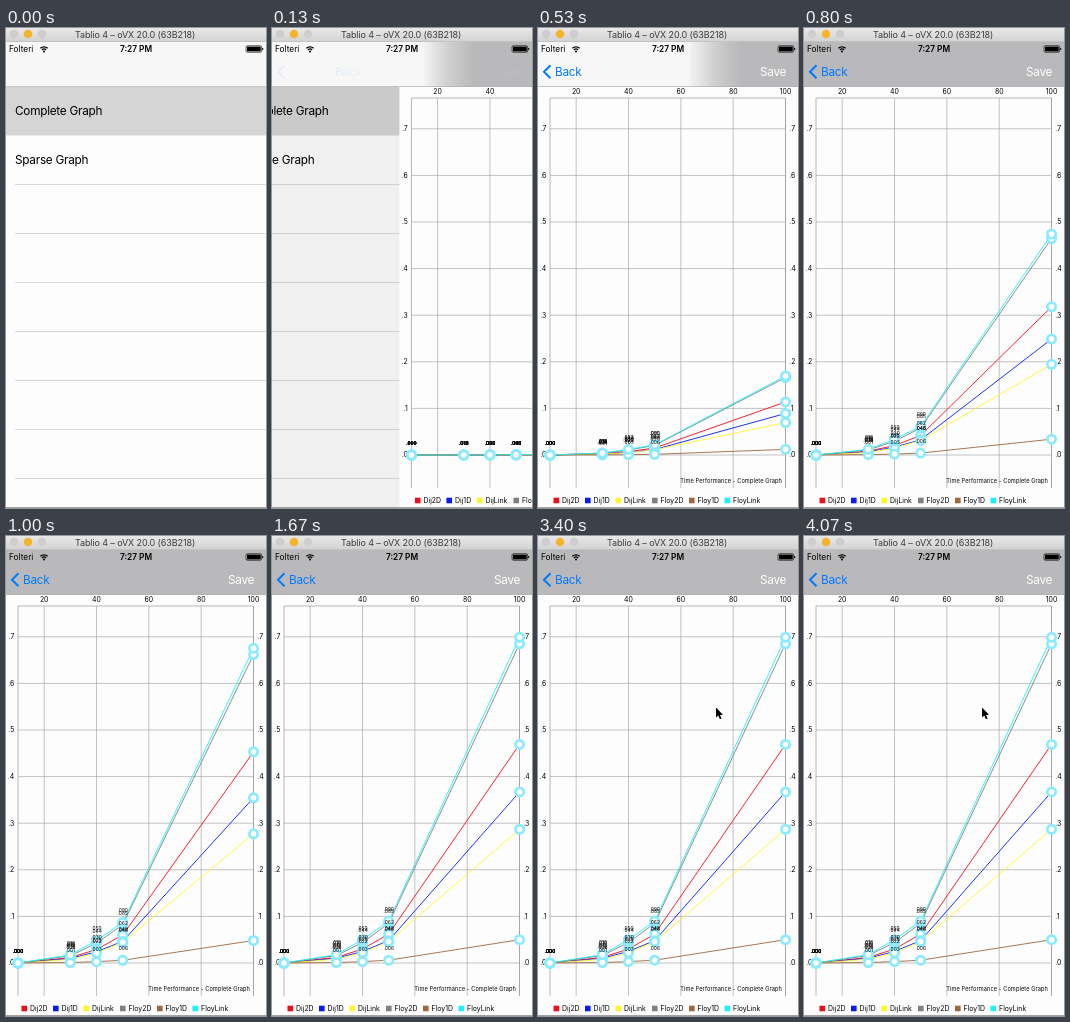
Recreate the animation shown at these times as an HTML page with a canvas. Size 260 px wide and 480 px high, loop 4140 ms.

```html
<!DOCTYPE html>
<html lang="en">
<head>
<meta charset="utf-8">
<title>Time performance chart</title>
<style>
html, body { margin: 0; width: 100%; height: 100%; overflow: hidden; background: #fff; }
canvas { display: block; width: 260px; height: 480px; }
</style>
</head>
<body>
<canvas id="stage"></canvas>
<script>
const W = 260, H = 480, LOOP = 4140, STEP = 1000 / 15;
const canvas = document.getElementById('stage');
const ratio = window.devicePixelRatio || 1;
canvas.width = W * ratio;
canvas.height = H * ratio;
const c = canvas.getContext('2d');
c.scale(ratio, ratio);

const BLUE = '#007aff';
const NAV_BOTTOM = 59;
const sizes = [10, 30, 40, 50, 100];
const series = [
  { name: 'Dij2D', color: '#f00d1c', at: 15.5, values: [0, .012, .030, .062, .469] },
  { name: 'Dij1D', color: '#0a1cf5', at: 47, values: [0, .010, .025, .048, .367] },
  { name: 'DijLink', color: '#fff52b', at: 77.5, values: [0, .008, .022, .046, .287] },
  { name: 'Floy2D', color: '#808080', at: 114, values: [0, .016, .044, .085, .685] },
  { name: 'Floy1D', color: '#a0683f', at: 151, values: [0, .001, .003, .006, .050] },
  { name: 'FloyLink', color: '#1cf3fb', at: 186.5, values: [0, .018, .050, .090, .699] }
];

const clamp = (v, lo = 0, hi = 1) => Math.min(hi, Math.max(lo, v));
const mix = (a, b, p) => a + (b - a) * p;
const px = size => 12 + (size - 10) * 2.617;
const py = value => 427 - value * 466;
const decimals = (v, n) => v.toFixed(n).replace(/^0/, '');

function rect(x, y, w, h, color) {
  c.fillStyle = color;
  c.fillRect(x, y, w, h);
}

function disc(x, y, r, color) {
  c.fillStyle = color;
  c.beginPath();
  c.arc(x, y, r, 0, 7);
  c.fill();
}

function stroke(points, color, width) {
  c.strokeStyle = color;
  c.lineWidth = width;
  c.beginPath();
  points.forEach(([x, y]) => c.lineTo(x, y));
  c.stroke();
}

function text(str, x, y, size, { color = '#000', align = 'left', weight = 400, spacing = 0 } = {}) {
  c.font = `${weight} ${size}px Inter, "Liberation Sans", sans-serif`;
  c.letterSpacing = spacing + 'px';
  c.textAlign = align;
  c.fillStyle = color;
  c.fillText(str, x, y);
}

function gradient(x0, y0, x1, y1, ...stops) {
  const g = c.createLinearGradient(x0, y0, x1, y1);
  stops.forEach((color, i) => g.addColorStop(i / (stops.length - 1), color));
  return g;
}

function drawTitleBar() {
  rect(0, 0, W, 14, gradient(0, 0, 0, 14, '#e8e8e8', '#d2d2d2'));
  rect(0, 13.3, W, .7, '#bcbcbc');
  disc(8, 6, 4.3, '#cfcdcf');
  disc(22, 6, 4.3, '#f6b42c');
  disc(36, 6, 4.3, '#cfcdcf');
  text('Tablio 4 – oVX 20.0 (63B218)', 129, 9.8, 9, { color: '#3c3c3c', align: 'center', spacing: -.1 });
}

function drawStatus() {
  text('Folteri', 3, 24, 8.3);
  [2.3, 4.6].forEach(r => {
    c.strokeStyle = '#000';
    c.lineWidth = 1.3;
    c.beginPath();
    c.arc(38, 24, r + .6, -2.35, -.79);
    c.stroke();
  });
  disc(38, 23.6, 1, '#000');
  text('7:27 PM', 130, 24, 8.3, { align: 'center', weight: 600 });
  c.strokeStyle = '#000';
  c.lineWidth = .6;
  c.beginPath();
  c.roundRect(240, 17.7, 15.6, 6.6, 1.4);
  c.stroke();
  rect(241, 18.6, 13.7, 4.8, '#000');
  rect(256.2, 20, 1, 2, '#000');
}

function drawNav(t, slide, pageX) {
  rect(0, 14, W, 45, '#f7f7f7');
  if (t >= 600) {
    rect(0, 14, W, 45, '#b9b8ba');
  } else if (t >= 70) {
    const edge = Math.max(152, pageX);
    rect(edge, 14, W - edge, 45, gradient(edge, 0, edge + 50, 0, '#f3f3f3', '#cfcfcf', '#b9b8ba'));
  }
  rect(0, 58.3, W, .7, '#b0b0b2');
  if (t < 70) return;
  c.globalAlpha = slide ** 4;
  stroke([[12.5, 37.3], [6, 43.8], [12.5, 50.3]], BLUE, 2);
  text('Back', 17 + pageX * .36, 48, 11.8, { color: BLUE, spacing: -.27 });
  text('Save', 222, 48, 11.8, { color: '#fff', spacing: -.27 });
  c.globalAlpha = 1;
}

function drawList(slide) {
  c.save();
  c.translate(-78 * slide, 0);
  rect(0, NAV_BOTTOM, W, H, '#fdfdfe');
  rect(0, NAV_BOTTOM, W, 48.5, '#d5d5d6');
  for (let y = 156; y < 460; y += 49) rect(9, y, W, .8, '#d2d1d5');
  text('Complete Graph', 9, 87, 11.8, { spacing: -.27 });
  text('Sparse Graph', 9, 136, 11.8, { spacing: -.27 });
  c.restore();
  rect(0, NAV_BOTTOM, W, H, `rgba(0, 0, 0, ${.1 * slide})`);
}

function drawGrid() {
  const grid = '#a9a9ab';
  for (let i = 0; i <= 7; i++) {
    const y = py(i / 10), label = '.' + i;
    stroke([[12, y], [247.5, y]], grid, .7);
    text(label, 8.3, y + 2.4, 6.9, { align: 'right' });
    text(label, 251.3, y + 2.4, 6.9);
  }
  for (let size = 20; size <= 100; size += 20) {
    stroke([[px(size), 70], [px(size), 460]], grid, .7);
    text(size, px(size), 66, 6.9, { align: 'center' });
  }
  stroke([[12, 460], [12, 70], [247.5, 70], [247.5, 460]], '#98989a', .7);
}

function drawChart(phase) {
  drawGrid();
  const place = (v, i) => [px(sizes[i]), py(v * phase)];
  series.forEach(s => stroke(s.values.map(place), s.color, .9));
  series.forEach(s => s.values.map(place).forEach(([x, y]) => {
    disc(x, y, 5.5, '#8ceaff');
    disc(x, y, 2.8, '#fff');
  }));
  series.forEach(s => s.values.slice(0, 4).forEach((v, i) => {
    const [x, y] = place(v, i);
    text(decimals(v, 3), x, y - 10.2, 4.9, { align: 'center' });
  }));
  text('Time Performance - Complete Graph', 244, 455.4, 5.6, { align: 'right', spacing: .12 });
  series.forEach(s => {
    rect(s.at, 469.7, 5.6, 5.6, s.color);
    text(s.name, s.at + 8.6, 475, 6.9);
  });
}

function drawPage(t, pageX) {
  c.save();
  c.translate(pageX, 0);
  rect(0, NAV_BOTTOM, W, H, '#fdfdfe');
  // the growth gathers speed slightly before a sine ease
  const s = t / 1000;
  const x = clamp(.128 + .769 * (s - .27) + .5616 * (s - .27) * (s - .53));
  drawChart(t > 1100 ? 1 : (1 - Math.cos(Math.PI * x)) / 2);
  c.restore();
}

function drawCursor(t) {
  if (t < 2730) return;
  const enter = clamp((t - 2730) / 70);
  const move = 1 - (1 - clamp((t - 2800) / 530)) ** 2;
  c.save();
  c.translate(mix(mix(252, 230, enter), 178, move), mix(mix(90, 104.5, enter), 171.5, move));
  c.beginPath();
  [[0, 0], [0, 10], [2.3, 8], [3.9, 11.8], [5.6, 11], [4, 7.4], [7, 7.2]].forEach(([x, y]) => c.lineTo(x, y));
  c.closePath();
  c.strokeStyle = '#fff';
  c.lineWidth = 1.4;
  c.stroke();
  c.fillStyle = '#000';
  c.fill();
  c.restore();
}

function draw(t) {
  const u = Math.max(0, t - 40) * .019;
  const left = t < 70 ? 1 : t >= 530 ? 0 : (1 + u) * Math.exp(-u);
  const pageX = W * left;
  drawList(1 - left);
  if (t >= 70) drawPage(t, pageX);
  drawNav(t, 1 - left, pageX);
  drawStatus();
  drawTitleBar();
  rect(0, 479.2, W, .8, '#8c8c8c');
  drawCursor(t);
}

// the screen refreshes fifteen times a second
function tick() {
  const step = Math.min(61, Math.floor((performance.now() % LOOP + 5) / STEP));
  draw(Math.round(step * STEP / 10) * 10);
  requestAnimationFrame(tick);
}
tick();
</script>
</body>
</html>
```
